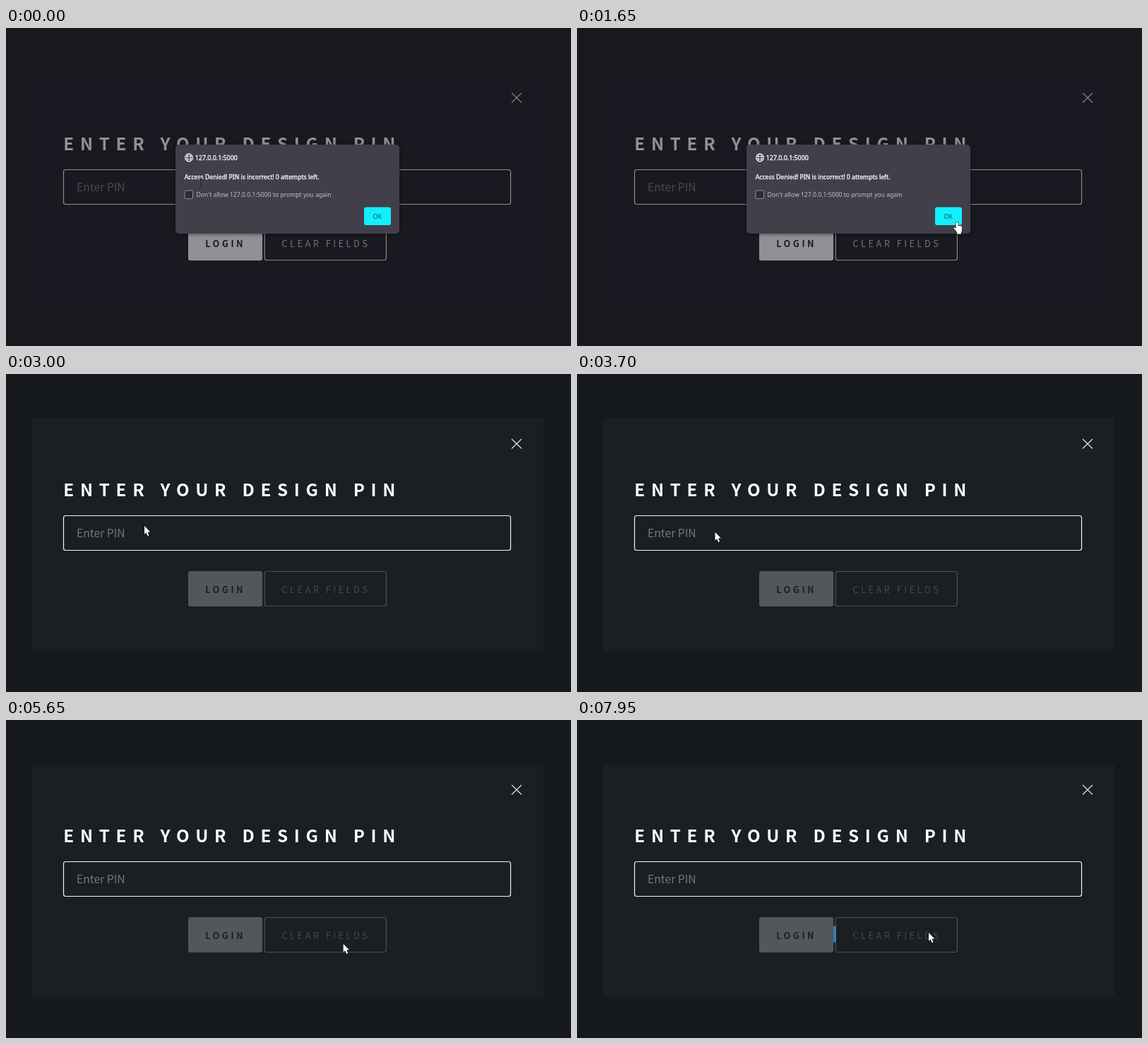
Recreate the animation shown at these times as an HTML page with a canvas. Size 800x450 px, loop 8000 ms.

```html
<!DOCTYPE html>
<html lang="en">
<head>
<meta charset="utf-8">
<title>PIN lockout</title>
<style>
  html, body { margin: 0; width: 100%; height: 100%; overflow: hidden; background: #15191d; }
  canvas { display: block; width: 800px; height: 450px; }
</style>
</head>
<body>
<canvas id="stage" width="800" height="450"></canvas>
<script>
const ctx = document.getElementById('stage').getContext('2d');
const LOOP = 8000, STEP = 50;
const DIALOG_CLOSES = 1750, LOCKED = 1850, SELECTED = 7800;
const PAGE_FONT = '"Noto Sans CJK JP", "Noto Sans CJK SC", "Noto Sans CJK", sans-serif';
const UI_FONT = '"Noto Sans", "Open Sans", sans-serif';

// Pointer hops: start, end, destination
const START = { x: 276, y: 213 };
const HOPS = [
  [0, 850, 581, 297], [1150, 1700, 537, 274], [2400, 2650, 220, 206], [2800, 3000, 196, 215],
  [4200, 4480, 345, 287], [4850, 5150, 498, 319], [5600, 5850, 302, 298],
  [6200, 6500, 496, 288], [6800, 7000, 284, 291], [7250, 7450, 504, 301], [7900, 7950, 498, 301]
];

const clamp = v => Math.min(1, Math.max(0, v));
const mix = (a, b, k) => a + (b - a) * k;
const white = alpha => `rgba(255,255,255,${alpha})`;

// Swinging back and forth across the input field
function sway(k) {
  return { x: 143 + 53 * Math.cos(3.5 * Math.PI * k), y: mix(215, 230, k) };
}

function pointerAt(t) {
  let p = START;
  for (const [from, to, x, y] of HOPS) {
    if (t < from) break;
    if (from === 4200) p = sway(1);
    const k = clamp((t - from) / (to - from)), e = k * k * (3 - 2 * k);
    p = { x: mix(p.x, x, e), y: mix(p.y, y, e) };
  }
  return t > 3000 && t < 4200 ? sway((t - 3000) / 1200) : p;
}

function box(x, y, w, h, r, fill, stroke, width = 1.2) {
  ctx.beginPath();
  ctx.roundRect(x, y, w, h, r);
  if (fill) { ctx.fillStyle = fill; ctx.fill(); }
  if (stroke) { ctx.strokeStyle = stroke; ctx.lineWidth = width; ctx.stroke(); }
}

function text(str, x, y, font, color, spacing = 0, embolden = 0) {
  ctx.font = font;
  ctx.letterSpacing = spacing + 'px';
  ctx.fillStyle = color;
  ctx.fillText(str, x, y);
  if (embolden) {
    ctx.strokeStyle = color;
    ctx.lineWidth = embolden;
    ctx.strokeText(str, x, y);
  }
}

function lines(color, width, ...segments) {
  ctx.beginPath();
  for (const [x0, y0, x1, y1] of segments) { ctx.moveTo(x0, y0); ctx.lineTo(x1, y1); }
  ctx.strokeStyle = color;
  ctx.lineWidth = width;
  ctx.stroke();
}

function drawPage(t) {
  const dimmed = t < DIALOG_CLOSES, settled = t > DIALOG_CLOSES;
  const panel = dimmed ? '#191a21' : settled ? '#1b1e22' : '#1a1c22';
  const light = dimmed ? 0.52 : 1;
  const button = light * mix(1, 0.25, clamp((t - DIALOG_CLOSES) / (LOCKED - DIALOG_CLOSES)));

  ctx.fillStyle = settled ? '#15191d' : '#1a181e';
  ctx.fillRect(0, 0, 800, 450);
  box(37, 62, 724, 330, 3, panel);
  lines(white(0.9 * light), 1.1, [716, 92, 730, 105.5], [730, 92, 716, 105.5]);
  text('ENTER YOUR DESIGN PIN', 81.3, 172.5, `700 24.2px ${PAGE_FONT}`, white(light), 8.72);
  box(81.5, 200.5, 633, 49, 3, null, white(0.95 * light));
  text('Enter PIN', 100, 231.3, `300 15.7px ${PAGE_FONT}`, white(0.4 * light));
  if (t >= SELECTED) {
    ctx.fillStyle = '#2080c8';
    ctx.fillRect(363, 291.5, 3.5, 23);
  }
  box(258, 279, 105, 50, 3, white(button));
  text('LOGIN', 282.2, 309.6, `700 12.7px ${PAGE_FONT}`, panel, 3.5);
  box(366.2, 279.5, 172.2, 49, 3, null, white(0.9 * button));
  text('CLEAR FIELDS', 390.3, 309.6, `300 12.8px ${PAGE_FONT}`, white(0.75 * button), 3.5);
}

function drawGlobe(x, y) {
  ctx.strokeStyle = '#f4f4f6';
  ctx.lineWidth = 1.1;
  for (const rx of [5.4, 2.6]) {
    ctx.beginPath();
    ctx.ellipse(x, y, rx, 5.4, 0, 0, Math.PI * 2);
    ctx.stroke();
  }
  lines('#f4f4f6', 1, [x - 5, y - 1.8, x + 5, y - 1.8], [x - 5, y + 1.8, x + 5, y + 1.8]);
}

function drawDialog() {
  ctx.save();
  ctx.shadowColor = 'rgba(0,0,0,.45)';
  ctx.shadowBlur = 5;
  ctx.shadowOffsetY = 1;
  box(240, 165, 317, 126, 5, '#423f4a');
  ctx.restore();
  drawGlobe(259, 183.5);
  text('127.0.0.1:5000', 267.8, 186.7, `400 8.83px ${UI_FONT}`, '#f8f8fa', 0, 0.35);
  text('Access Denied! PIN is incorrect! 0 attempts left.', 252.7, 214,
    `400 8.66px ${UI_FONT}`, '#f8f8fa', 0, 0.35);
  box(253, 230, 11.5, 11.5, 1.5, '#2d2b35', '#8f8d98', 1);
  text("Don't allow 127.0.0.1:5000 to prompt you again", 269.5, 239,
    `400 8.65px ${UI_FONT}`, '#c1bfc7');
  box(507, 253.5, 38, 25.5, 3, '#12efff');
  text('OK', 519.6, 269.5, `400 8.7px ${UI_FONT}`, '#14525f');
}

function paintPointer() {
  ctx.strokeStyle = '#111318';
  ctx.lineWidth = 1.2;
  ctx.stroke();
  ctx.fillStyle = '#fff';
  ctx.fill();
}

function drawArrow() {
  ctx.beginPath();
  ctx.moveTo(0, 0);
  ctx.lineTo(0, 11.8);
  ctx.lineTo(2.6, 9.5);
  ctx.lineTo(4.6, 14.2);
  ctx.lineTo(6.5, 13.3);
  ctx.lineTo(4.6, 8.8);
  ctx.lineTo(8.2, 8.5);
  ctx.closePath();
  paintPointer();
}

function drawHand() {
  ctx.beginPath();
  ctx.roundRect(-1.5, 0, 3.2, 12, 1.6);
  ctx.roundRect(-1.5, 5.5, 8.5, 9, 2);
  ctx.roundRect(0, 11, 6, 6, 1);
  ctx.moveTo(-1, 13);
  ctx.lineTo(-5, 8.5);
  ctx.lineTo(-3.6, 7.4);
  ctx.lineTo(-1, 9.4);
  ctx.lineTo(1, 15);
  ctx.closePath();
  paintPointer();
}

function drawTextCaret({ x, y }) {
  lines('#292831', 1, [x, y + 0.5, x, y + 10.5], [x - 2, y + 0.5, x + 2, y + 0.5],
    [x - 2, y + 10.5, x + 2, y + 10.5]);
}

function drawPointer(t) {
  const { x, y } = pointerAt(t);
  ctx.save();
  ctx.translate(x, y);
  if (t >= 1600 && t < 2450) drawHand();
  else drawArrow();
  ctx.restore();
}

function frame(now) {
  const t = Math.floor((now % LOOP) / STEP) * STEP;
  drawPage(t);
  if (t < DIALOG_CLOSES) drawDialog();
  if (t < 900) drawTextCaret(START);
  if (t > 0) drawPointer(t);
  requestAnimationFrame(frame);
}
requestAnimationFrame(frame);
</script>
</body>
</html>
```
